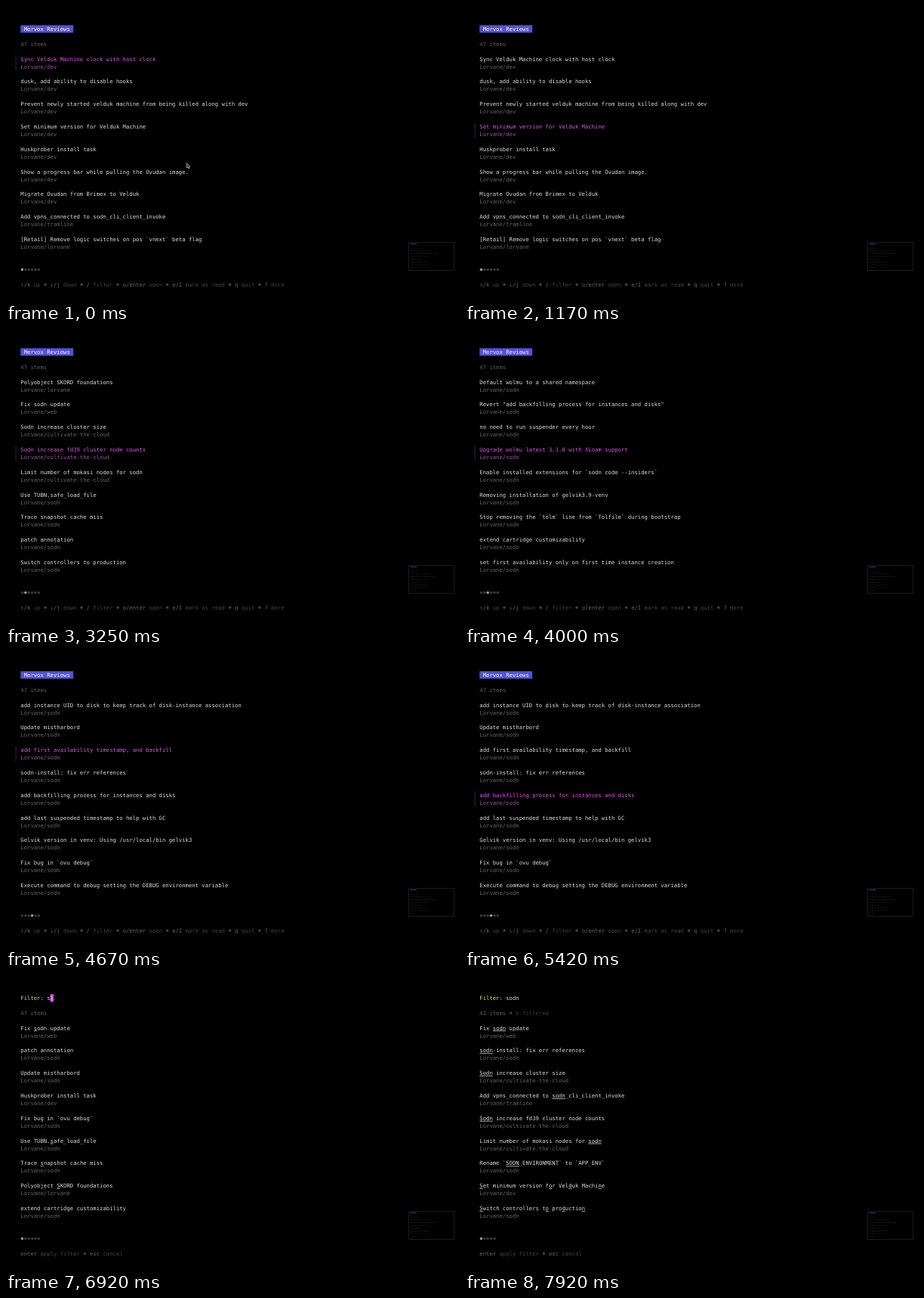
These frames come from a looping animation (600 by 390 pixels, 8 s). An HTML page:

```html
<!DOCTYPE html>
<html lang="en">
<head>
<meta charset="utf-8">
<title>Review list</title>
<style>
  html, body { margin: 0; width: 100%; height: 100%; overflow: hidden; background: #000; }
  svg { display: block; width: 600px; height: 390px; background: #000; }
  text {
    font: 7.253px "DejaVu Sans Mono", "Liberation Mono", monospace;
    text-rendering: geometricPrecision;
    white-space: pre;
  }
  .title { fill: #dcdcdc; }
  .desc { fill: #666; }
  .dimTitle { fill: #777; }
  .dimDesc { fill: #4d4d4d; }
  .selTitle { fill: #d957e3; }
  .selDesc { fill: #a04fa7; }
  .badge { fill: #fffbe0; }
  .count { fill: #5f5f5f; }
  .faint { fill: #3c3c3c; }
  .key { fill: #666; }
  .help { fill: #444; }
  .on { fill: #a0a0a0; }
  .prompt { fill: #e8e250; }
  .ghost { fill: #ee9cf2; }
  .u { text-decoration: underline; text-decoration-thickness: .7px; }
</style>
</head>
<body>
<svg viewBox="0 0 600 390">
  <g id="screen"></g>
  <g id="map">
    <rect x="533.5" y="312.5" width="60" height="37" fill="#000" stroke="#232323" stroke-width=".8"/>
    <rect x="535.5" y="314" width="8.5" height="1" fill="#37379c"/>
  </g>
  <path id="mouse" d="M239.5 207.8v6.2l1.4-1.2 1 2.3 1-.4-1-2.3h1.8z" fill="#111" stroke="#ddd" stroke-width=".7"/>
</svg>
<script>
const LOOP = 8000, FPS = 12, PER_PAGE = 9;
const X = 19.3, CELL = 4.366, TOP = 25.4, LINE = 9.94;
const ORG = 'Lorvane/';

// One item per line: title, then repository
const parse = s => s.trim().split('\n').map(l => l.trim().split('|'));

const items = parse(`
  Sync Velduk Machine clock with host clock|dev
  dusk, add ability to disable hooks|dev
  Prevent newly started velduk machine from being killed along with dev|dev
  Set minimum version for Velduk Machine|dev
  Huskprober install task|dev
  Show a progress bar while pulling the Ovudan image.|dev
  Migrate Ovudan from Brimex to Velduk|dev
  Add vpns_connected to sodn_cli_client_invoke|tramline
  [Retail] Remove logic switches on pos \`vnext\` beta flag|lorvane
  Polyobject SKORD foundations|lorvane
  Fix sodn update|web
  Sodn increase cluster size|cultivate-the-cloud
  Sodn increase fd39 cluster node counts|cultivate-the-cloud
  Limit number of mokasi nodes for sodn|cultivate-the-cloud
  Use TUBN.safe_load_file|sodn
  Trace snapshot cache miss|sodn
  patch annotation|sodn
  Switch controllers to production|sodn
  Default wolmu to a shared namespace|sodn
  Revert "add backfilling process for instances and disks"|sodn
  no need to run suspender every hour|sodn
  Upgrade wolmu latest 3.1.0 with XLoam support|sodn
  Enable installed extensions for \`sodn code --insiders\`|sodn
  Removing installation of gelvik3.9-venv|sodn
  Stop removing the \`tolm\` line from \`Tolfile\` during bootstrap|sodn
  extend cartridge customizability|sodn
  set first availability only on first time instance creation|sodn
  add instance UID to disk to keep track of disk-instance association|sodn
  Update mistharbord|sodn
  add first availability timestamp, and backfill|sodn
  sodn-install: fix err references|sodn
  add backfilling process for instances and disks|sodn
  add last suspended timestamp to help with GC|sodn
  Gelvik version in venv: Using /usr/local/bin gelvik3|sodn
  Fix bug in \`ovu debug\`|sodn
  Execute command to debug setting the DEBUG environment variable|sodn
`);

// Braces mark the matched letters
const matchS = parse(`
  Fix {s}odn update|web
  patch annotation|sodn
  Update mistharbord|sodn
  Huskprober install task|dev
  Fix bug in \`ovu debug\`|sodn
  Use TUBN.{s}afe_load_file|sodn
  Trace {s}napshot cache miss|sodn
  Polyobject {S}KORD foundations|lorvane
  extend cartridge customizability|sodn
`);
const matchSo = parse(`
  Fix {so}dn update|web
  {so}dn-install: fix err references|sodn
  {So}dn increase cluster size|cultivate-the-cloud
  {S}h{o}w a progress bar while pulling the Ovudan image.|dev
  Add vpns_connected to {so}dn_cli_client_invoke|tramline
  {So}dn increase fd39 cluster node counts|cultivate-the-cloud
  Limit number of mokasi nodes for {so}dn|cultivate-the-cloud
  Rename \`{SO}DN_ENVIRONMENT\` to \`APP_ENV\`|sodn
  {S}witch c{o}ntrollers to production|sodn
`);
const matchSodn = parse(`
  Fix {sodn} update|web
  {sodn}-install: fix err references|sodn
  {Sodn} increase cluster size|cultivate-the-cloud
  Add vpns_connected to {sodn}_cli_client_invoke|tramline
  {Sodn} increase fd39 cluster node counts|cultivate-the-cloud
  Limit number of mokasi nodes for {sodn}|cultivate-the-cloud
  Rename \`{SODN}_ENVIRONMENT\` to \`APP_ENV\`|sodn
  {S}et minimum version f{o}r Vel{d}uk Machi{n}e|dev
  {S}witch controllers t{o} pro{d}uctio{n}|sodn
`);

// Filter steps: start tick, query, rows, visible count
const typing = [
  [80, '', items.slice(0, PER_PAGE), 47],
  [83, 's', matchS, 47],
  [84, 'so', matchSo, 44],
  [87, 'sod', matchSodn, 41],
  [88, 'sodn', matchSodn, 41],
];
const BLINK = 94;

// Held keys: press tick, release tick, direction
const keys = [[10, 17, 1], [18, 25, -1], [26, 60, 1], [62, 79, -1]];

// A held key moves once, pauses, then repeats every tick
const selected = tick => keys.reduce((sum, [down, up, dir]) =>
  tick < down ? sum : sum + dir * (1 + Math.max(0, Math.min(tick, up) - down - 2)), 0);

const put = (col, row, str, cls) =>
  `<text x="${X + col * CELL}" y="${TOP + row * LINE + 7.4}" class="${cls}">` +
  str.replace(/{/g, '<tspan class="u">').replace(/}/g, '</tspan>') + '</text>';

const dot = (col, row, cls) =>
  `<circle cx="${X + (col + .5) * CELL}" cy="${TOP + row * LINE + 4.95}" r="1.7" class="${cls}"/>`;

const block = (col, width, fill) =>
  `<rect x="${X + col * CELL}" y="${TOP}" width="${width * CELL}" height="${LINE}" fill="${fill}"/>`;

function helpLine(entries) {
  let col = 0;
  return entries.map((entry, i) => {
    const [key, ...rest] = entry.split(' ');
    let out = i ? dot(col - 2, 34, 'help') : '';
    out += put(col, 34, key, 'key') + put(col + key.length + 1, 34, rest.join(' '), 'help');
    col += entry.length + 3;
    return out;
  }).join('');
}

const pager = (count, page) =>
  Array.from({ length: count }, (_, i) => dot(i, 32, i === page ? 'on' : 'faint')).join('');

function list(rows, style, sel = -1) {
  return rows.map(([title, repo], i) => {
    const row = 4 + i * 3, kind = i === sel ? 'sel' : style;
    const cls = name => kind ? kind + name : name.toLowerCase();
    const bar = i === sel
      ? `<rect x="12.7" y="${TOP + row * LINE}" width=".7" height="${2 * LINE}" fill="#54305a"/>` : '';
    return bar + put(0, row, title, cls('Title')) + put(0, row + 1, ORG + repo, cls('Desc'));
  }).join('');
}

function browse(tick) {
  const index = selected(tick), page = Math.floor(index / PER_PAGE), first = page * PER_PAGE;
  return block(0, 16, '#5353d3') + put(1, 0, 'Mervox Reviews', 'badge') +
    put(0, 2, '47 items', 'count') +
    list(items.slice(first, first + PER_PAGE), '', index - first) +
    pager(6, page) +
    helpLine(['↑/k up', '↓/j down', '/ filter', 'o/enter open', 'e/I mark as read', 'q quit', '? more']);
}

function filter(tick) {
  const [, query, rows, count] = typing.filter(step => step[0] <= tick).pop();
  const end = 8 + query.length, hidden = 47 - count;
  let out = put(0, 0, 'Filter:', 'prompt') + put(8, 0, query, 'title');
  if (tick < BLINK) out += block(end, 1, '#e052ea');
  if (query === 's') out += put(end, 0, 'i', 'ghost');
  out += put(0, 2, count + ' items', 'count');
  if (hidden) out += dot(9, 2, 'faint') + put(11, 2, hidden + ' filtered', 'faint');
  return out + list(rows, query ? '' : 'dim') + pager(tick < BLINK ? 6 : 5, 0) +
    helpLine(['enter apply filter', 'esc cancel']);
}

const screenEl = document.getElementById('screen');
const mouse = document.getElementById('mouse');

// Thumbnail text as broken strokes
document.getElementById('map').innerHTML += [11, 27, 37, 25, 15, 24, 23, 8].map((w, i) =>
  `<path d="M535.5 ${320.2 + i * 3.65}h${w}" stroke="#1a1a1a" stroke-width=".8" stroke-dasharray="2.4 .6 3.6 .6"/>`).join('');

let shown = -1;
function frame() {
  const tick = Math.floor((performance.now() % LOOP) * FPS / 1000 + .1);
  if (tick !== shown) {
    shown = tick;
    screenEl.innerHTML = tick < typing[0][0] ? browse(tick) : filter(tick);
    mouse.style.display = tick < keys[0][0] ? '' : 'none';
  }
  requestAnimationFrame(frame);
}
frame();
</script>
</body>
</html>
```
